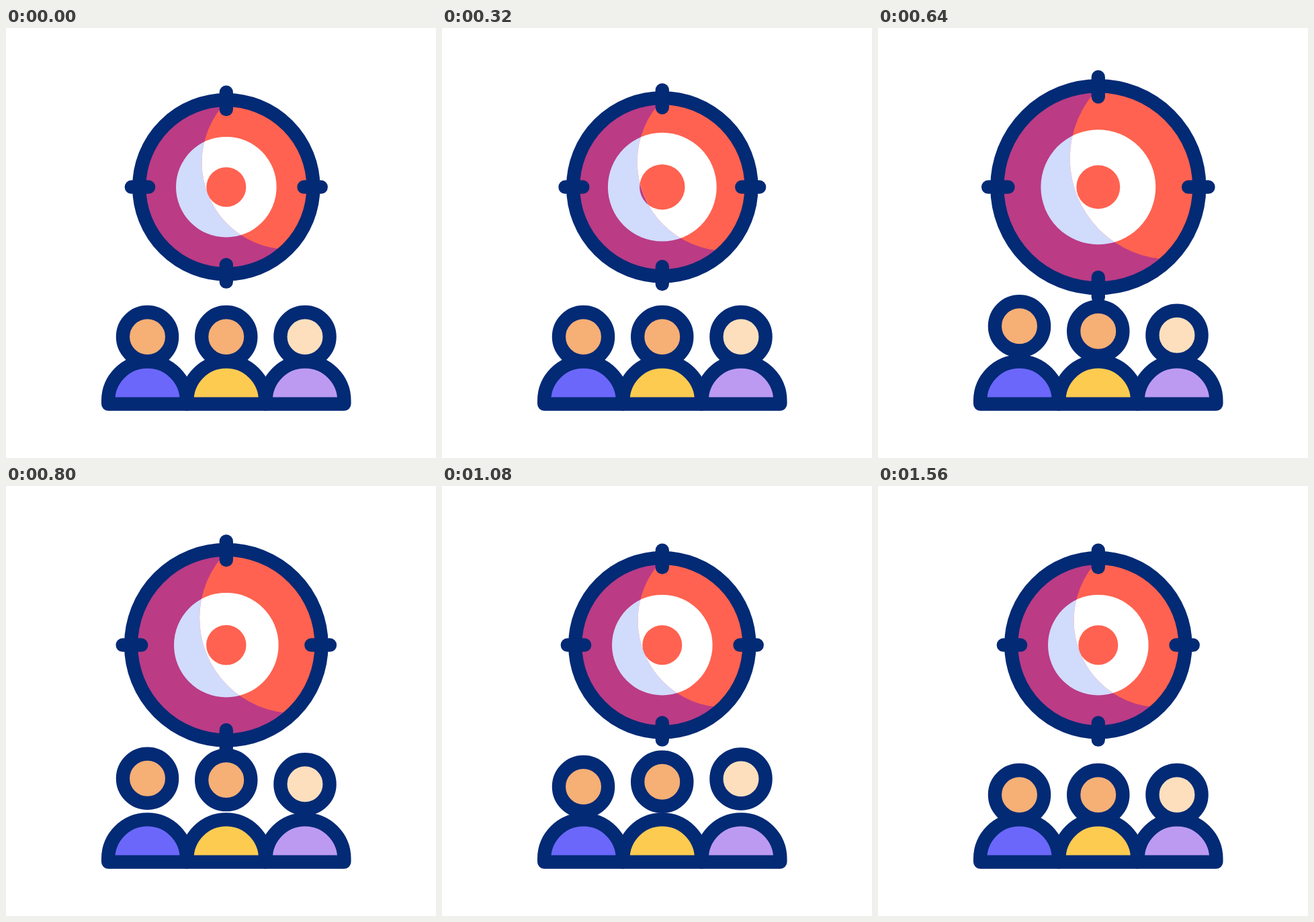
Animation, 640 px wide and 640 px high, one loop 1.68 s. Source, as an HTML page with a canvas:

```html
<!DOCTYPE html>
<html lang="en">
<head>
<meta charset="utf-8">
<title>Target audience</title>
<style>
  html, body { margin: 0; overflow: hidden; background: #fff; }
  canvas { display: block; }
</style>
</head>
<body>
<canvas id="stage" width="640" height="640"></canvas>
<script>
const ctx = document.getElementById('stage').getContext('2d');
const LOOP = 1680, STEP = 40, RAMP = 400;
const NAVY = '#032a75', RED = '#ff6250', MAGENTA = '#bb3b85', LAVENDER = '#d1dbfc';
const CENTER = { x: 327.8, y: 236.7 };
const PEOPLE = [
  { x: 210.5, skin: '#f6af75', shirt: '#6b67fa', start: 400 },
  { x: 327.75, skin: '#f6af75', shirt: '#fdcb50', start: 480 },
  { x: 445, skin: '#fddfbd', shirt: '#bc9af2', start: 560 }
];

const ease = u => (1 - Math.cos(Math.PI * Math.min(1, Math.max(0, u)))) / 2;

// Rises from 0 to 1, holds, then falls back to 0.
const pulse = (t, start, hold = 0) =>
  ease((t - start) / RAMP) - ease((t - start - RAMP - hold) / RAMP);

function circle(x, y, r) {
  ctx.beginPath();
  ctx.arc(x, y, r, 0, 2 * Math.PI);
}

function disc(r, color) {
  circle(0, 0, r);
  ctx.fillStyle = color;
  ctx.fill();
}

function drawTarget(t) {
  const outer = 1 + 0.162 * pulse(t, 220);
  const middle = 74.8 * (1 + 0.174 * pulse(t, 128));
  const inner = 29.5 * (1 + 0.188 * pulse(t, 50));
  const ring = 129.6 * outer;
  const discs = (dark, pale) => {
    disc(ring, dark);
    disc(middle, pale);
    disc(inner, dark);
  };

  ctx.save();
  ctx.translate(CENTER.x, CENTER.y);
  discs(MAGENTA, LAVENDER);
  ctx.save();
  circle(93.2 * outer, -36.7 * outer, 129.5 * outer);
  ctx.clip();
  discs(RED, '#fff');
  ctx.restore();

  circle(0, 0, ring);
  ctx.stroke();
  for (let i = 0; i < 4; i++) {
    ctx.beginPath();
    ctx.moveTo(0, 115.7 * outer);
    ctx.lineTo(0, 141 * outer);
    ctx.stroke();
    ctx.rotate(Math.PI / 2);
  }
  ctx.restore();
}

function drawPerson({ x, skin, shirt, start }, t) {
  ctx.beginPath();
  ctx.moveTo(x - 58.4, 559.6);
  ctx.arc(x, 554.8, 58.4, Math.PI, 0);
  ctx.lineTo(x + 58.4, 559.6);
  ctx.closePath();
  ctx.fillStyle = shirt;
  ctx.fill();
  ctx.stroke();

  circle(x, 459.6 - 24.3 * pulse(t, start, 80), 36.6);
  ctx.fillStyle = skin;
  ctx.fill();
  ctx.stroke();
}

function draw(now) {
  const t = Math.floor(now % LOOP / STEP) * STEP;
  ctx.fillStyle = '#fff';
  ctx.fillRect(0, 0, 640, 640);
  ctx.strokeStyle = NAVY;
  ctx.lineWidth = 20.3;
  ctx.lineCap = ctx.lineJoin = 'round';
  drawTarget(t);
  PEOPLE.forEach(person => drawPerson(person, t));
}

function frame() {
  draw(performance.now());
  requestAnimationFrame(frame);
}
frame();
</script>
</body>
</html>
```
